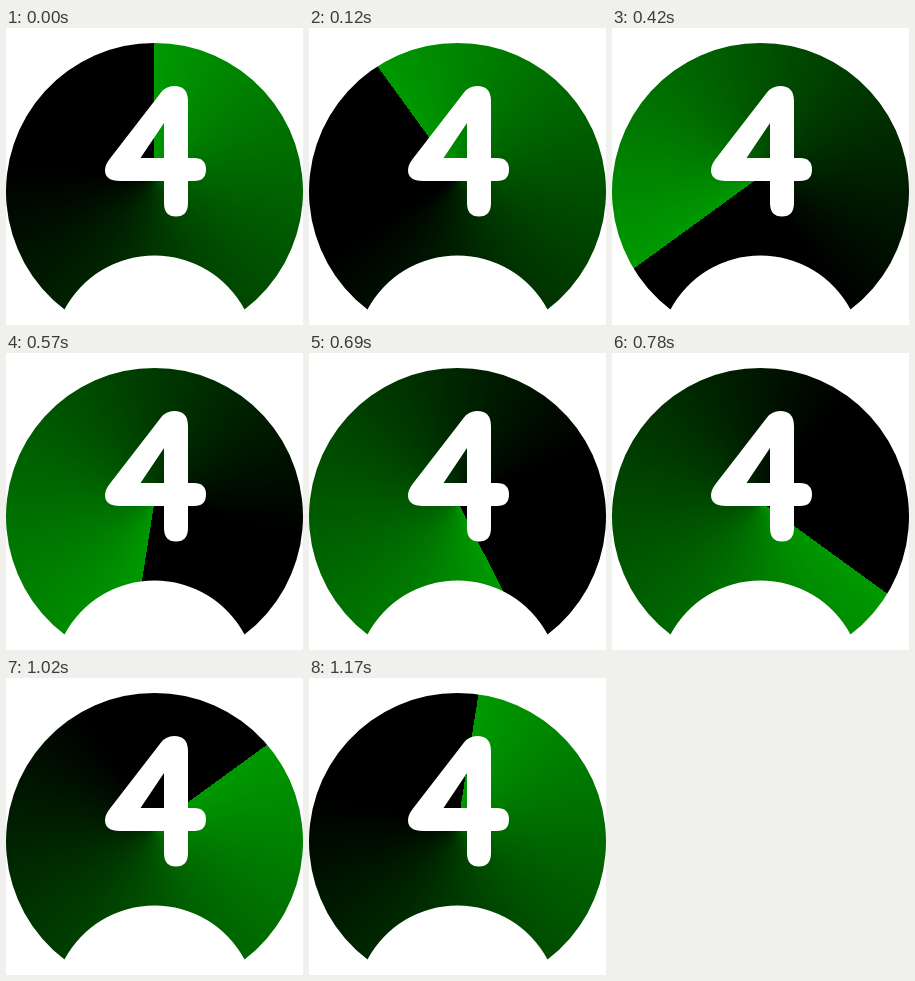
Recreate the animation shown at these times as an HTML page with a canvas. Size 297 by 297 pixels, loop 1.2 s.

```html
<!DOCTYPE html>
<html lang="en">
<head>
<meta charset="utf-8">
<title>Radar countdown</title>
<style>
  html, body { margin: 0; width: 100%; height: 100%; overflow: hidden; background: #fff; }
  canvas { display: block; }
</style>
</head>
<body>
<canvas id="stage" width="297" height="297"></canvas>
<script>
const ctx = document.getElementById('stage').getContext('2d');
const SIZE = 297, CENTER = SIZE / 2, STEP_MS = 30, STEPS = 40;

// Disc with a circular bite taken out of its lower edge
const dial = new Path2D('M58.5 281.5 A148.5 148.5 0 1 1 238.5 281.5 A102 102 0 0 0 58.5 281.5 Z');

// Rounded numeral with its triangular counter
const four = new Path2D(
  'M155 64.5 Q160 58 168 58 Q182 58 182 73 V130 H188 Q200 130 200 141.5 Q200 153 188 153' +
  ' H182 V175 Q182 188.5 170 188.5 Q158 188.5 158 175 V153 H114 Q99 153 99 142 Q99 137 104 130.5 Z' +
  ' M158 130 H134.5 L158 95 Z');

function draw(now) {
  const step = Math.floor(now / STEP_MS) % STEPS;
  const angle = -Math.PI / 2 - step / STEPS * 2 * Math.PI;
  const sweep = ctx.createConicGradient(angle, CENTER, CENTER);
  sweep.addColorStop(0, '#009900');
  sweep.addColorStop(0.76, '#000');
  sweep.addColorStop(1, '#000');

  ctx.fillStyle = '#fff';
  ctx.fillRect(0, 0, SIZE, SIZE);
  ctx.fillStyle = sweep;
  ctx.fill(dial);
  ctx.fillStyle = '#fff';
  ctx.fill(four, 'evenodd');
}

const start = performance.now();
function tick() {
  draw(performance.now() - start);
  requestAnimationFrame(tick);
}
tick();
</script>
</body>
</html>
```
